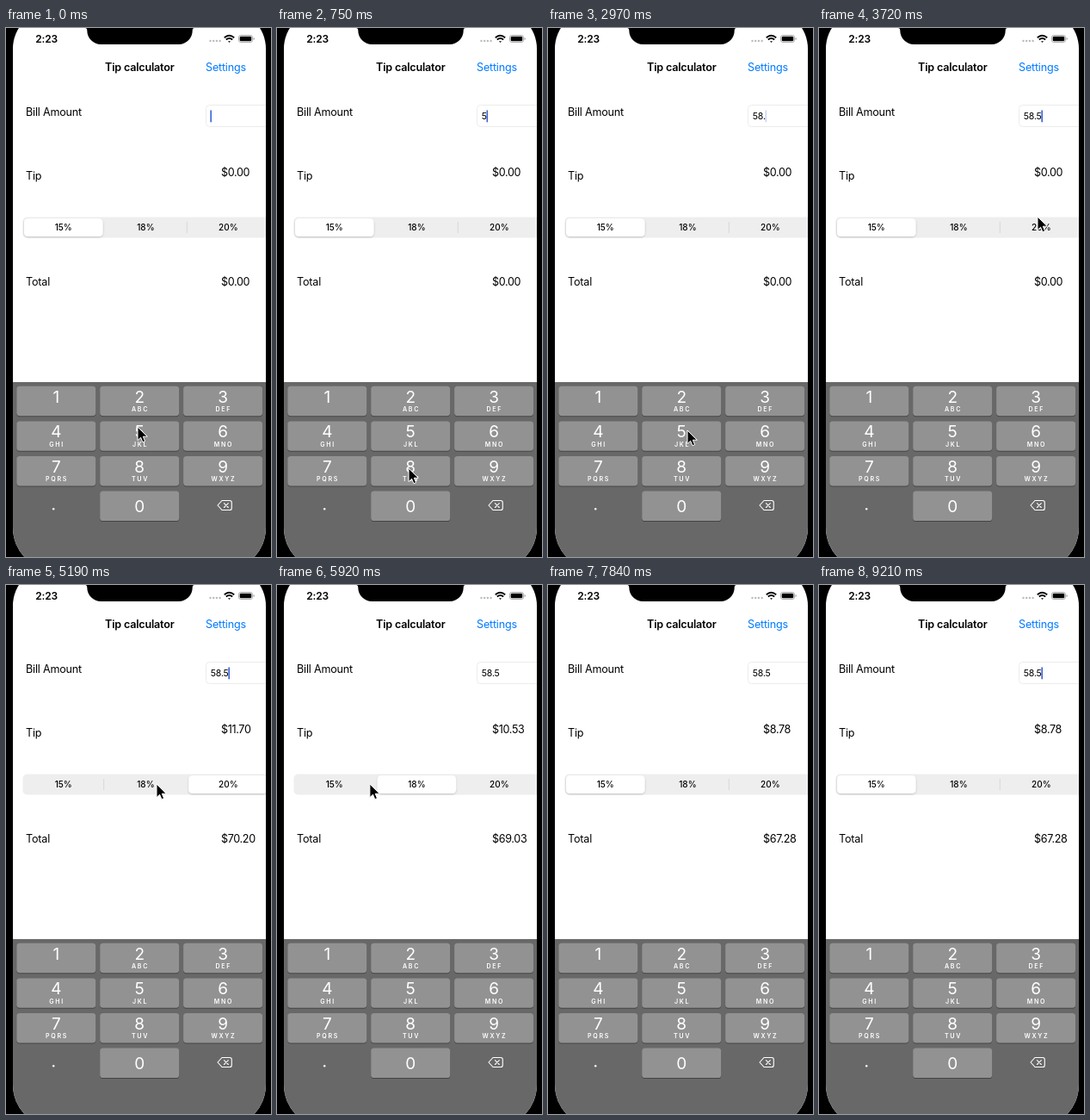
Write an HTML page that moves like this. It is 308x614 px and loops after 9230 ms.

```html
<!DOCTYPE html>
<html lang="en">
<head>
<meta charset="utf-8">
<title>Tip calculator</title>
<style>
  html, body { margin: 0; width: 100%; height: 100%; overflow: hidden; background: #000; }
  svg { display: block; width: 308px; height: 614px; font: 12.6px Inter, sans-serif; letter-spacing: -.2px; }
  .mid { text-anchor: middle; }
  .title { font-weight: 600; }
  .money { letter-spacing: -.35px; }
  .segment { font-size: 10px; font-weight: 500; letter-spacing: 0; }
  .digit { font-size: 19px; fill: #fff; letter-spacing: 0; }
  .letters { font-size: 7.1px; font-weight: 600; fill: #fff; letter-spacing: 1.7px; }
</style>
</head>
<body>
<svg viewBox="0 0 308 614">
  <defs>
    <clipPath id="screen"><path d="M8 24A45 45 0 0 1 53-21H257A45 45 0 0 1 302 24V580A50 50 0 0 1 252 630H58A50 50 0 0 1 8 580z"/></clipPath>
    <filter id="soft" x="-10%" y="-20%" width="120%" height="160%">
      <feDropShadow dx="0" dy="1" stdDeviation="1" flood-opacity=".2"/>
    </filter>
  </defs>
  <rect width="308" height="614"/>
  <g clip-path="url(#screen)">
    <rect width="308" height="614" fill="#fff"/>
    <text x="34.3" y="17" class="title" style="font-size:12px">2:23</text>
    <g fill="#bbb">
      <circle cx="237.5" cy="15" r="1.2"/><circle cx="241.2" cy="15" r="1.2"/>
      <circle cx="244.9" cy="15" r="1.2"/><circle cx="248.6" cy="15" r="1.2"/>
    </g>
    <g fill="none" stroke="#000" stroke-width="1.8">
      <path d="M253.8 11.2q5.7-4.8 11.4 0M255.8 13.5q3.7-3 7.4 0"/>
      <path d="M258 15.3h3l-1.5 1.6z" fill="#000" stroke="none"/>
    </g>
    <rect x="270.5" y="8.5" width="16" height="8" rx="2.3" fill="none" stroke="#999" stroke-width=".8"/>
    <rect x="271.7" y="9.7" width="13.6" height="5.6" rx="1.3"/>
    <path d="M287.6 11v3q1.2-.3 1.2-1.5t-1.2-1.5" fill="#999"/>

    <text x="155.3" y="50" class="mid title">Tip calculator</text>
    <text x="232" y="50" fill="#007aff">Settings</text>
    <text x="23" y="102">Bill Amount</text>
    <text x="23" y="176">Tip</text>
    <text x="23" y="299">Total</text>
    <text id="tip" x="250" y="172" class="money"></text>
    <text id="total" x="250" y="299" class="money"></text>

    <rect x="232.5" y="89.5" width="90" height="25" rx="4" fill="#fff" stroke="#ececec"/>
    <text id="bill" x="237.7" y="106" style="font-size:10.6px"></text>
    <rect id="caret" y="95.3" width="1.6" height="14.2" rx=".8" fill="#3a62d9"/>

    <rect x="19.5" y="219.5" width="300" height="24" rx="5" fill="#eeeeef"/>
    <path id="divider1" d="M113.7 225v13" stroke="#d8d8da"/>
    <path id="divider2" d="M210.3 225v13" stroke="#d8d8da"/>
    <rect id="pill" y="221" width="91.5" height="21" rx="4.5" fill="#fff" filter="url(#soft)"/>
    <text x="66.7" y="235" class="mid segment">15%</text>
    <text x="162.4" y="235" class="mid segment">18%</text>
    <text x="258.4" y="235" class="mid segment">20%</text>

    <rect y="411" width="308" height="204" fill="#686868"/>
    <g id="keys"></g>
    <circle cx="55.2" cy="558.3" r="1.2" fill="#fff"/>
    <path d="M251 548.5h9q2.3 0 2.3 2.3v6.4q0 2.3-2.3 2.3h-9l-5-5.5zM253.5 551.7l4.8 4.8m0-4.8l-4.8 4.8"
      fill="none" stroke="#fff" stroke-width="1.1" stroke-linejoin="round" stroke-linecap="round"/>
  </g>
  <path d="M92 0q2.3 0 2.3 3a16 16 0 0 0 16 16h90.4a16 16 0 0 0 16-16q0-3 2.3-3z"/>
  <path id="cursor" d="M0 0v15.6l3.6-3.4 2.3 5.5 2.7-1.1-2.3-5.4h5z" stroke="#fff" stroke-width="1" stroke-linejoin="round"/>
</svg>
<script>
const LOOP = 9230, STEP = 148;
const $ = id => document.getElementById(id);
const clamp = v => Math.max(0, Math.min(1, v));
const set = (id, name, value) => $(id).setAttribute(name, value);

// time, x, y of the pointer tip
const path = [
  [0, 153, 463], [148, 152.5, 471], [444, 152.5, 471], [740, 153, 511], [1200, 153, 511],
  [1630, 115, 531], [1930, 63.5, 556], [2380, 63.5, 556], [2960, 162, 467], [3270, 162, 467],
  [3700, 254, 219], [3860, 257, 228], [4450, 257, 228], [5180, 175, 231], [5480, 175, 231],
  [6070, 85, 231], [6220, 85, 231], [6808, 212, 190], [7700, 266, 588]
];
const typed = [[592, '5'], [1184, '58'], [2220, '58.'], [3256, '58.5']];
const presses = [[444, 592, 5], [1036, 1184, 8], [3108, 3256, 5]];
const choices = [[4144, 2], [5328, 1], [6068, 0]];
const rates = [15, 18, 20];

const letters = ['', 'ABC', 'DEF', 'GHI', 'JKL', 'MNO', 'PQRS', 'TUV', 'WXYZ'];
function key(digit, col, row, label) {
  const x = 12.3 + col * 96.9, y = 415.8 + row * 40.6, cx = x + 46;
  return `<rect x="${x}" y="${y + 1}" width="92" height="34.4" rx="3.6" fill="#454545"/>
    <rect id="key${digit}" x="${x}" y="${y}" width="92" height="34.4" rx="3.6"/>
    <text x="${cx}" y="${y + (label === undefined ? 24 : 18.9)}" class="mid digit">${digit}</text>
    <text x="${cx + .8}" y="${y + 29.4}" class="mid letters">${label || ''}</text>`;
}
$('keys').innerHTML = letters.map((label, i) => key(i + 1, i % 3, Math.floor(i / 3), label)).join('') + key(0, 1, 3);

function pointer(t) {
  const i = path.findIndex(p => p[0] > t);
  if (i < 0) return null;
  const [t0, x0, y0] = path[i - 1], [t1, x1, y1] = path[i], k = (t - t0) / (t1 - t0);
  return [x0 + (x1 - x0) * k, y0 + (y1 - y0) * k];
}

function caretOpacity(since) {
  const p = since % 1000;
  return p < 600 ? 1 - clamp((p - 450) / 90) : clamp((p - 700) / 150);
}

const money = cents => '$' + (Math.round(cents) / 100).toFixed(2);

function draw(t) {
  const [typeTime, bill] = typed.filter(e => e[0] <= t).pop() || [0, ''];
  $('bill').textContent = bill;
  set('caret', 'x', 237.4 + (bill ? $('bill').getComputedTextLength() : 0));
  set('caret', 'opacity', bill ? caretOpacity(t - typeTime) : 1);

  for (let d = 0; d < 10; d++) {
    const down = presses.some(([from, to, digit]) => digit === d && t >= from && t < to);
    set('key' + d, 'fill', down ? '#707070' : '#929292');
  }

  let slot = 0, rate = 0;
  for (const [time, index] of choices) {
    if (t < time) break;
    const k = clamp((t - time + 74) / 370);
    slot += (index - slot) * k * k * (3 - 2 * k);
    rate = rates[index];
  }
  set('pill', 'x', 21 + slot * 95.6);
  set('divider1', 'opacity', clamp(slot - 1) + .25 * clamp(1 - slot));
  set('divider2', 'opacity', clamp(1 - slot));
  const amount = rate ? 58.5 : 0;
  $('tip').textContent = money(amount * rate);
  $('total').textContent = money(amount * (100 + rate));

  const at = pointer(t);
  set('cursor', 'visibility', at ? 'visible' : 'hidden');
  if (at) set('cursor', 'transform', `translate(${at})`);
}

function tick() {
  const t = performance.now() % LOOP;
  draw(Math.floor((t + 5) / STEP) * STEP);
  requestAnimationFrame(tick);
}
tick();
</script>
</body>
</html>
```
